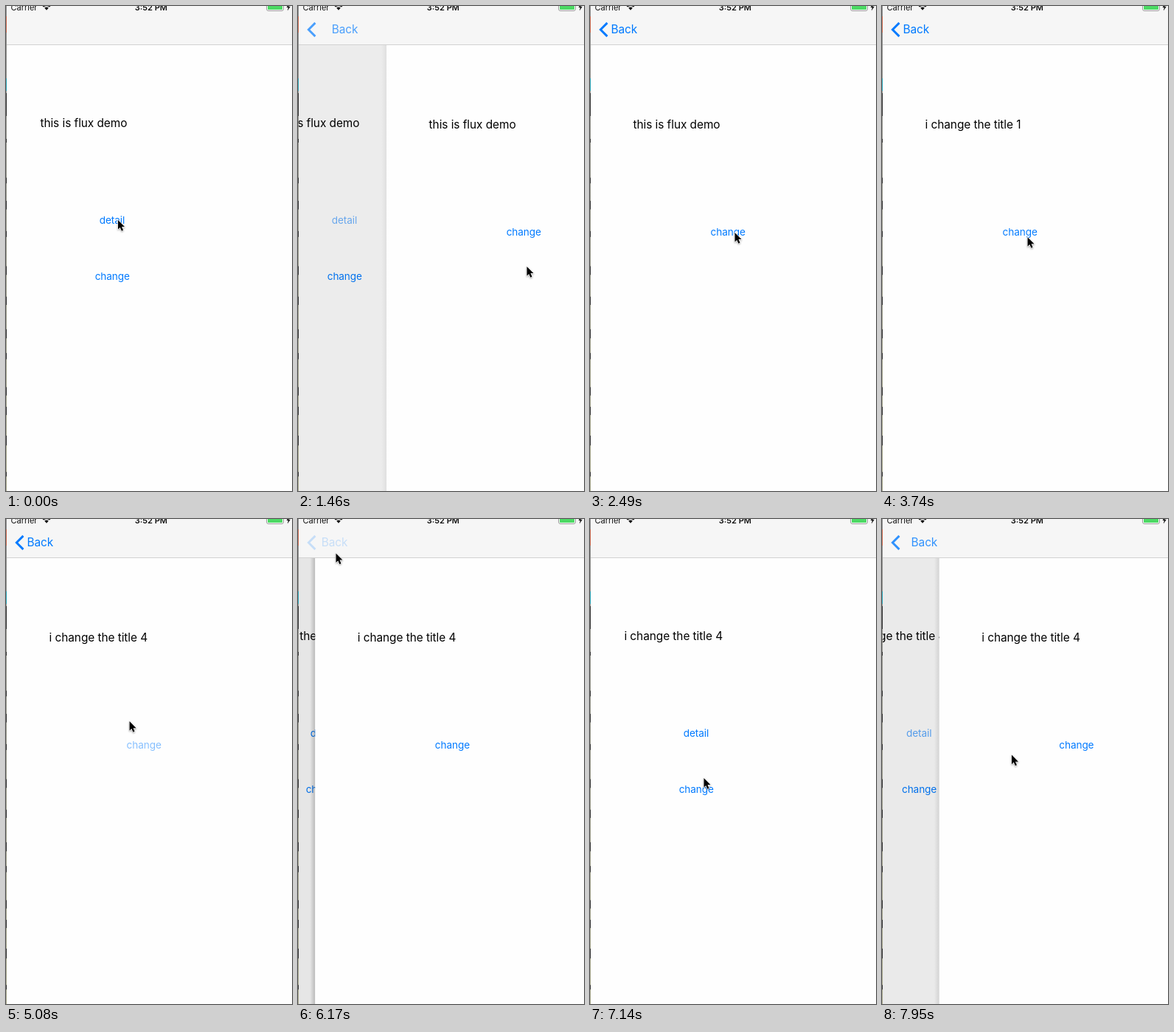
Recreate the animation shown at these times as an HTML page. Size 388x657 px, loop 8000 ms.

```html
<!DOCTYPE html>
<html lang="en">
<head>
<meta charset="utf-8">
<title>Flux demo</title>
<style>
  html, body { margin: 0; width: 100%; height: 100%; overflow: hidden; background: #fefefe; }
  svg { display: block; width: 388px; height: 657px; font-family: Inter, Roboto, sans-serif; }
  .label { font-size: 15.4px; letter-spacing: -.05px; fill: #000; }
  .button { font-size: 13.6px; letter-spacing: -.1px; fill: #007aff; }
  .back { font-size: 15.4px; letter-spacing: -.1px; fill: #007aff; }
  .status { font-size: 11px; fill: #111; }
  #cursor { filter: drop-shadow(0 1px 1px rgba(0, 0, 0, .35)); }
</style>
</head>
<body>
<svg viewBox="0 0 388 657">
  <defs>
    <linearGradient id="edge">
      <stop offset="0" stop-color="#000" stop-opacity="0"/>
      <stop offset="1" stop-color="#000" stop-opacity=".24"/>
    </linearGradient>
    <linearGradient id="wallpaper" x2="0" y2="1">
      <stop offset="0" stop-color="#8f8f8f"/>
      <stop offset="1" stop-color="#a8a88c"/>
    </linearGradient>
    <clipPath id="screen"><rect x="1" y="53" width="387" height="604"/></clipPath>
  </defs>
  <rect width="388" height="657" fill="#fefefe"/>

  <g clip-path="url(#screen)">
    <g id="home">
      <text id="homeTitle" class="label" x="46.4" y="164"></text>
      <text id="homeDetail" class="button" x="126.700" y="295">detail</text>
      <text class="button" x="120.700" y="371">change</text>
    </g>
    <rect id="dim" x="1" y="53" width="387" height="604"/>
    <g id="detail">
      <rect id="shadow" x="-6" y="53" width="7" height="604" fill="url(#edge)"/>
      <rect x="1" y="53" width="389" height="604" fill="#fefefe"/>
      <text id="detailTitle" class="label" x="58.5" y="166"></text>
      <text id="detailChange" class="button" x="163.6" y="311">change</text>
    </g>
  </g>

  <rect x="1" width="387" height="52" fill="#f6f6f6"/>
  <rect x="1" y="52" width="387" height="1" fill="#d2d2d2"/>
  <g id="nav">
    <path d="M23.4 22.900 14.300 32l9.100 9.100" fill="none" stroke="#007aff" stroke-width="2.9"/>
    <text id="backText" class="back" x="28.5" y="37.4">Back</text>
  </g>

  <text class="status" x="6.5" y="6">Carrier</text>
  <path d="M49.5 0q5.5-4 11 0l-1.5 1.5q-4-3-8 0zM52.2 2.6q2.8-2 5.6 0L55 5.7z" fill="#111"/>
  <text class="status" x="174.8" y="6" font-weight="600">3:52 PM</text>
  <rect x="353.5" y="-5" width="23" height="11.5" rx="2.5" fill="#fff" stroke="#999"/>
  <rect x="355" y="-4" width="20" height="9" rx="1" fill="#4cd964"/>
  <path d="M384-3l-3.5 5h2.3l-1 4.5 4-5.7h-2.4z" fill="#111"/>

  <g id="desktop">
    <rect width="1" height="657" fill="url(#wallpaper)"/>
    <rect y="14" width="1" height="22" fill="#c96a50"/>
    <rect y="98" width="1" height="17" fill="#2ba3b5"/>
    <rect y="118" width="1" height="31" fill="#333"/>
  </g>
  <path id="cursor" d="M0 0V12.6L2.8 9.9 4.9 14.7 7 13.8 5 9.1H9Z"
        fill="#000" stroke="#fff" stroke-width="1.2" paint-order="stroke" stroke-linejoin="round"/>
</svg>
<script>
const LOOP = 8000, WIDTH = 389, SVG_NS = 'http://www.w3.org/2000/svg';
const el = Object.fromEntries([...document.querySelectorAll('[id]')].map(e => [e.id, e]));
const clamp = x => Math.max(0, Math.min(1, x));
const smooth = u => u * u * (3 - 2 * u);

// Dark bits of the desktop showing left of the phone
let seed = 7;
const random = () => (seed = seed * 16807 % 2147483647) / 2147483647;
for (let y = 180; y < 650; y += 25 + 30 * random()) {
  const bit = document.createElementNS(SVG_NS, 'rect');
  const attributes = { y, width: 1, height: 5 + 9 * random(), fill: '#333' };
  for (const name in attributes) bit.setAttribute(name, attributes[name]);
  el.desktop.append(bit);
}

const firstPush = { down: 910, up: 1329 };
const secondPush = { down: 7620, up: 7786 };
const pop = { down: 5940, up: 6150 };
const titleTaps = [3450, 4560, 4800, 4980].map(up => ({ down: up - 90, up }));

// The cursor rests at each stop until the glide to the next one
const GLIDE = 320;
const stops = [
  { at: 0, x: 152, y: 290 },
  { at: 1430, x: 310.5, y: 353 },
  { at: 2310, x: 196.5, y: 307 },
  { at: 3920, x: 199, y: 322 },
  { at: 4340, x: 196, y: 311 },
  { at: 5300, x: 75.5, y: 154.5 },
  { at: 5700, x: 43, y: 43 },
  { at: 6170, x: 51.5, y: 46.5 },
  { at: 6730, x: 180, y: 218 },
  { at: 7140, x: 154.5, y: 351 },
  { at: 7560, x: 145, y: 291 },
  { at: LOOP, x: 178, y: 321.5 }
];

function cursorAt(t) {
  if (t < 430) {
    const angle = 2 * Math.PI * clamp((t - 60) / 370);
    return [130 + 22 * Math.cos(angle), 290 - 71 * Math.sin(angle)];
  }
  const i = stops.findIndex(stop => stop.at > t);
  const from = stops[i - 1], to = stops[i];
  const k = smooth(clamp((t - to.at + GLIDE) / GLIDE));
  return [from.x + (to.x - from.x) * k, from.y + (to.y - from.y) * k];
}

// Critically damped spring of the navigation slide
function spring(ms) {
  if (ms <= 0) return 0;
  if (ms >= 500) return 1;
  const w = .01826 * ms;
  return 1 - (1 + w) * Math.exp(-w);
}

function buttonOpacity(taps, t) {
  const tap = taps.filter(({ down }) => t >= down).pop();
  return tap ? .2 + .8 * clamp((t - tap.up) / 300) : 1;
}

function render(t) {
  const shown = spring(t - firstPush.up) - spring(t - pop.up) + spring(t - secondPush.up);
  const shift = WIDTH * (1 - shown);
  const count = titleTaps.filter(({ up }) => t >= up).length;
  const title = count ? `i change the title ${count}` : 'this is flux demo';
  const backPressed = t >= pop.down && t < secondPush.up;

  el.homeTitle.textContent = el.detailTitle.textContent = title;
  el.home.setAttribute('transform', `translate(${-.3 * WIDTH * shown})`);
  el.detail.setAttribute('transform', `translate(${shift})`);
  el.dim.setAttribute('opacity', .1 * shown);
  el.shadow.setAttribute('opacity', shown ** 4);
  el.nav.setAttribute('opacity', shown * (backPressed ? .2 : 1));
  el.backText.setAttribute('transform', `translate(${.145 * shift})`);
  el.homeDetail.setAttribute('opacity', buttonOpacity([firstPush, secondPush], t));
  el.detailChange.setAttribute('opacity', buttonOpacity(titleTaps, t));
  el.cursor.setAttribute('transform', `translate(${cursorAt(t)})`);
}

const start = performance.now();
function tick() {
  render((performance.now() - start) % LOOP);
  requestAnimationFrame(tick);
}
tick();
</script>
</body>
</html>
```
